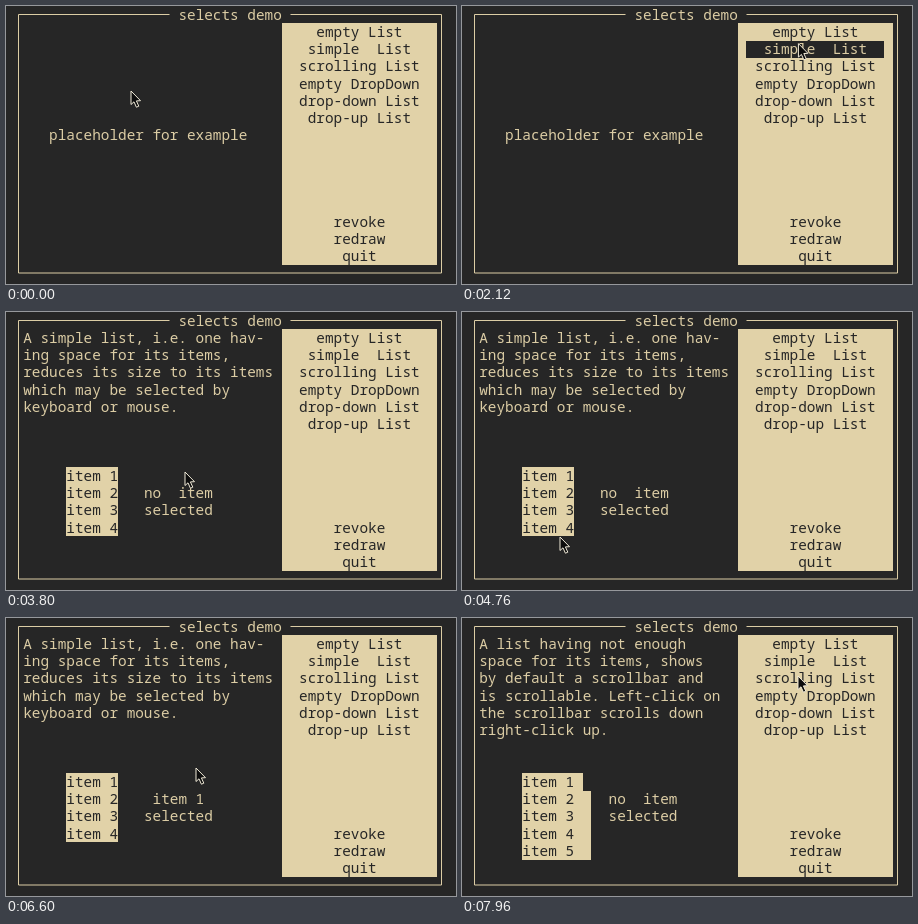
These frames come from a looping animation (450x278 px, 8000 ms). An HTML page with a canvas:

```html
<!DOCTYPE html>
<html lang="en">
<head>
<meta charset="utf-8">
<title>selects demo</title>
<style>
html, body { margin: 0; width: 100%; height: 100%; overflow: hidden; background: #262626; }
canvas { display: block; width: 450px; height: 278px; }
</style>
</head>
<body>
<canvas id="stage" width="450" height="278"></canvas>
<script>
const ctx = document.getElementById('stage').getContext('2d');
const DARK = '#262626', LIGHT = '#e1d2a8', INK = '#dccda5';
const CW = 8.62, RH = 17.25, LOOP = 8000, STEP = 40;

const menu = {
  1: [36, 'empty List'], 2: [35, 'simple  List'], 3: [34, 'scrolling List'],
  4: [34, 'empty DropDown'], 5: [34, 'drop-down List'], 6: [35, 'drop-up List'],
  12: [38, 'revoke'], 13: [38, 'redraw'], 14: [39, 'quit']
};
const simpleText = ['A simple list, i.e. one hav-', 'ing space for its items,',
  'reduces its size to its items', 'which may be selected by', 'keyboard or mouse.'];
const scrollText = ['A list having not enough', 'space for its items, shows',
  'by default a scrollbar and', 'is scrollable. Left-click on', 'the scrollbar scrolls down', 'right-click up.'];

// Clicks: time at which each one takes effect
const SIMPLE = 3080, ITEM = 5720, SCROLL = 7640;

// Pointer stops: time, x, y
const path = [
  [0, 125, 85], [760, 328, 24], [1880, 328, 24], [2280, 341, 45],
  [3160, 341, 45], [3800, 179, 160], [4160, 94, 148], [4760, 98, 225],
  [5520, 93, 163], [6040, 93, 163], [6600, 190, 150], [6880, 190, 150],
  [7480, 336, 58], [8000, 336, 58]
];

function pointerAt(t) {
  const i = path.findIndex(p => p[0] > t);
  const [t0, x0, y0] = path[i - 1], [t1, x1, y1] = path[i];
  const u = (t - t0) / (t1 - t0), e = u * u * (3 - 2 * u);
  return [x0 + (x1 - x0) * e, y0 + (y1 - y0) * e];
}

function text(col, row, str, color = INK) {
  ctx.fillStyle = color;
  ctx.fillText(str, col * CW, row * RH + 13.6);
}

function block(c0, r0, c1, r1, color) {
  const x = Math.round(c0 * CW), y = Math.round(r0 * RH);
  ctx.fillStyle = color;
  ctx.fillRect(x, y, Math.round(c1 * CW) - x, Math.round(r1 * RH) - y);
}

function drawFrame() {
  ctx.strokeStyle = INK;
  ctx.lineWidth = 1;
  ctx.beginPath();
  ctx.moveTo(163.5, 8.5);
  ctx.lineTo(12.5, 8.5);
  ctx.lineTo(12.5, 267);
  ctx.lineTo(435.5, 267);
  ctx.lineTo(435.5, 8.5);
  ctx.lineTo(284.5, 8.5);
  ctx.stroke();
  text(20, 0, 'selects demo');
}

function drawMenu(hover) {
  block(32, 1, 50, 15, LIGHT);
  for (const row in menu) {
    const on = +row === hover;
    if (on) block(33, hover, 49, hover + 1, DARK);
    text(menu[row][0], +row, menu[row][1], on ? INK : DARK);
  }
}

function drawList(count, width, hover) {
  block(7, 9, 7 + width, 9 + count, LIGHT);
  for (let i = 0; i < count; i++) {
    const on = hover === 9 + i;
    if (on) block(7, hover, 13, hover + 1, DARK);
    text(7, 9 + i, 'item ' + (i + 1), on ? INK : DARK);
  }
}

function drawExample(t, hover) {
  if (t < SIMPLE) return text(5, 7, 'placeholder for example');
  const scrolling = t >= SCROLL;
  (scrolling ? scrollText : simpleText).forEach((line, i) => text(2, i + 1, line));
  const col = scrolling ? 17 : 16;
  if (scrolling) {
    drawList(5, 8, hover);
    block(14, 9, 15, 10, DARK);
  } else {
    drawList(4, 6, hover);
  }
  if (t >= ITEM && !scrolling) text(17, 10, 'item 1');
  else text(col, 10, 'no  item');
  text(col, 11, 'selected');
}

function drawPointer(x, y) {
  ctx.beginPath();
  [[0, 0], [0, 13.5], [3, 10.8], [5.4, 16.2], [7.8, 15.2], [5.4, 9.9], [9.5, 9.7]]
    .forEach(([dx, dy]) => ctx.lineTo(x + dx, y + dy));
  ctx.closePath();
  ctx.fillStyle = '#0c0c0c';
  ctx.fill();
  ctx.strokeStyle = '#f0ead8';
  ctx.lineWidth = 1;
  ctx.stroke();
}

function draw(t) {
  const [x, y] = pointerAt(t);
  const col = x / CW, row = Math.floor(y / RH);
  const inMenu = col >= 32 && col < 50, inList = col >= 7 && col < 13;
  // A clicked row loses its highlight until another one is entered
  const clicked = t >= SCROLL ? 3 : t >= ITEM ? 9 : t >= SIMPLE ? 2 : 0;
  const hover = row === clicked ? -1 : row;

  ctx.fillStyle = DARK;
  ctx.fillRect(0, 0, 450, 278);
  ctx.font = CW / 0.6 + 'px "Noto Sans Mono", "DejaVu Sans Mono", monospace';
  drawFrame();
  drawExample(t, inList ? hover : -1);
  drawMenu(inMenu ? hover : -1);
  drawPointer(x, y);
}

function tick() {
  const t = performance.now() % LOOP;
  draw(Math.floor(t / STEP) * STEP);
  requestAnimationFrame(tick);
}
tick();
</script>
</body>
</html>
```
